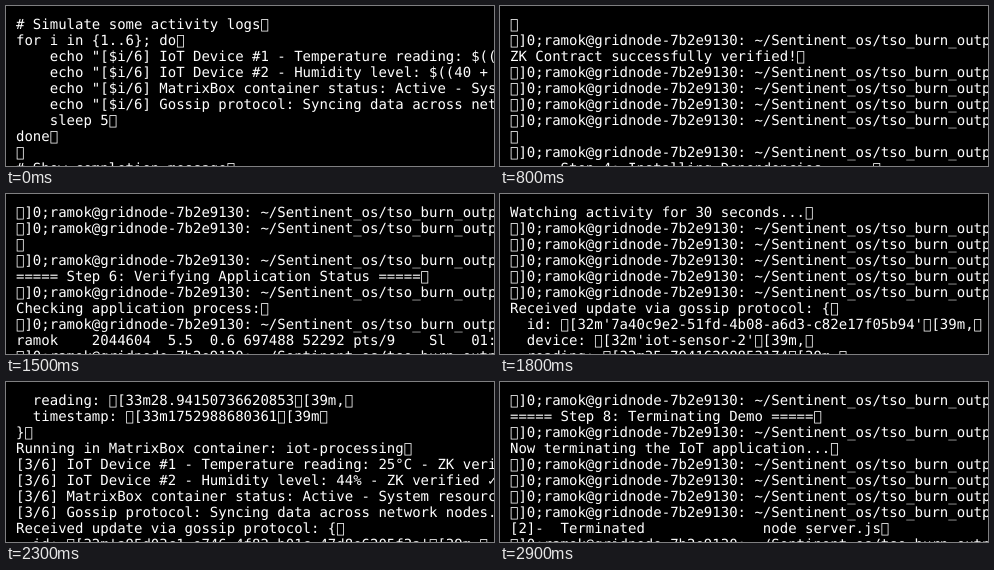
Recreate the animation shown at these times as an HTML page. Size 488 px wide and 160 px high, loop 3000 ms.

```html
<!DOCTYPE html>
<html lang="en">
<head>
<meta charset="utf-8">
<title>Terminal log</title>
<style>
  html, body { margin: 0; width: 100%; height: 100%; overflow: hidden; background: #000; }
  #screen {
    position: absolute; left: 10px; top: 11px; width: 478px; height: 149px;
    margin: 0; overflow: hidden; white-space: pre; color: #fff;
    font: 14px/16px "DejaVu Sans Mono", monospace;
    font-variant-ligatures: none; text-rendering: geometricPrecision;
  }
</style>
</head>
<body>
<pre id="screen"></pre>
<script>
const LOOP = 3000, STEP = 100, ROWS = 10, LINES_PER_TICK = 6.2;
const HOLDS = [6, 7, 12]; // steps on which the log stands still

// Unassigned code point: shows the font's empty box, as control characters do
const BOX = "\u0378";
const USER = "ramok";
const PROMPT = `${BOX}]0;${USER}@gridnode-7b2e9130: ~/Sentinent_os/tso_burn_output`;

const ln = text => text + BOX;
const paint = (code, text) => `${BOX}[${code}m${text}${BOX}[0m`;
const prompts = n => Array(n).fill(PROMPT);
const step = (n, title) => [PROMPT, ln(`===== Step ${n}: ${title} =====`), PROMPT];
const field = (key, code, value, end = ",") =>
  ln(`  ${key}: ${BOX}[${code}m${value}${BOX}[39m${end}`);

function round(n, id, reading, time, temp, humidity) {
  const tag = `[${n}/6] `;
  return [
    ln("Received update via gossip protocol: {"),
    field("id", 32, `'${id}'`),
    field("device", 32, "'iot-sensor-2'"),
    field("reading", 33, reading),
    field("timestamp", 33, time, ""),
    ln("}"),
    ln("Running in MatrixBox container: iot-processing"),
    ln(`${tag}IoT Device #1 - Temperature reading: ${temp}°C - ZK verified ✓`),
    ln(`${tag}IoT Device #2 - Humidity level: ${humidity}% - ZK verified ✓`),
    ln(`${tag}MatrixBox container status: Active - System resources: OK`),
    ln(`${tag}Gossip protocol: Syncing data across network nodes...`)
  ];
}

const rule = paint("0;34", "=".repeat(36));

const log = [
  ln("# Simulate some activity logs"),
  ln("for i in {1..6}; do"),
  ln('    echo "[$i/6] IoT Device #1 - Temperature reading: $((20 + RANDOM % 10))°C"'),
  ln('    echo "[$i/6] IoT Device #2 - Humidity level: $((40 + RANDOM % 30))%"'),
  ln('    echo "[$i/6] MatrixBox container status: Active - System resources: OK"'),
  ln('    echo "[$i/6] Gossip protocol: Syncing data across network nodes..."'),
  ln("    sleep 5"),
  ln("done"),
  BOX,
  ln("# Show completion message"),
  ln('echo -e "${GREEN}TSO demo completed successfully${NC}"'),
  ln("EOL"),
  PROMPT,
  BOX,
  ...step(2, "Starting TSO Runtime"),
  ...prompts(2),
  ln("[1] 2044152"),
  PROMPT,
  rule,
  paint("0;34", "   SentientOS TSO Runtime v0.1.0   "),
  rule,
  paint("1;33", "Initializing SentientOS runtime..."),
  paint("1;33", "Starting ZK verification service..."),
  paint("1;33", "Starting MatrixBox container runtime..."),
  paint("0;32", "SentientOS TSO Runtime initialized"),
  ...prompts(2),
  BOX,
  ...step(3, "Verifying ZK Contract"),
  ...prompts(3),
  BOX,
  PROMPT,
  ln("ZK Contract successfully verified!"),
  ...prompts(4),
  BOX,
  ...step(4, "Installing Dependencies"),
  ln("Installing required npm packages..."),
  PROMPT,
  BOX,
  ln("up to date, audited 69 packages in 1s"),
  BOX,
  ln("14 packages are looking for funding"),
  ln("  run `npm fund` for details"),
  BOX,
  ln("found 0 vulnerabilities"),
  ...prompts(2),
  BOX,
  ...step(5, "Starting IoT Application"),
  ln("Launching the IoT application..."),
  PROMPT,
  ln("[2] 2044604"),
  ...prompts(6),
  BOX,
  ...prompts(3),
  BOX,
  ...step(6, "Verifying Application Status"),
  ln("Checking application process:"),
  PROMPT,
  ln(`${USER}    2044604  5.5  0.6 697488 52292 pts/9    Sl   01:17   0:00 node server.js`),
  ...prompts(6),
  BOX,
  ...step(7, "Monitoring IoT Activity"),
  ln("Watching activity for 30 seconds..."),
  ...prompts(5),
  ...round(1, "7a40c9e2-51fd-4b08-a6d3-c82e17f05b94", "35.70416298853174", 1752988670355, 26, 58),
  ...round(2, "d1721468-bda1-45b2-9ef3-055914f96427", "42.19828211752641", 1752988675358, 22, 67),
  ...round(3, "30be58f7-92c4-4d1a-8b67-6f9a02d3e815", "28.94150736620853", 1752988680361, 25, 44),
  ...round(4, "a95d03c1-e746-4f82-b01c-47d8e6205f3a", "39.06371845209317", 1752988685364, 21, 61),
  ...round(5, "fc76b681-6138-44b7-bfa4-4e1b64b88089", "21.227690896856256", 1752988690366, 29, 52),
  ...prompts(2),
  paint("0;32", "TSO demo completed successfully"),
  ...prompts(3),
  BOX,
  ...step(8, "Terminating Demo"),
  ln("Now terminating the IoT application..."),
  ...prompts(4),
  ln("[2]-  Terminated              node server.js"),
  PROMPT
];

const screen = document.getElementById("screen");
let shown = -1;

function draw() {
  const now = Math.floor(performance.now() % LOOP / STEP);
  const tick = now - HOLDS.filter(h => h <= now).length;
  if (tick !== shown) {
    shown = tick;
    const top = Math.floor(tick * LINES_PER_TICK);
    screen.textContent = log.slice(top, top + ROWS).join("\n");
  }
  requestAnimationFrame(draw);
}
draw();
</script>
</body>
</html>
```
